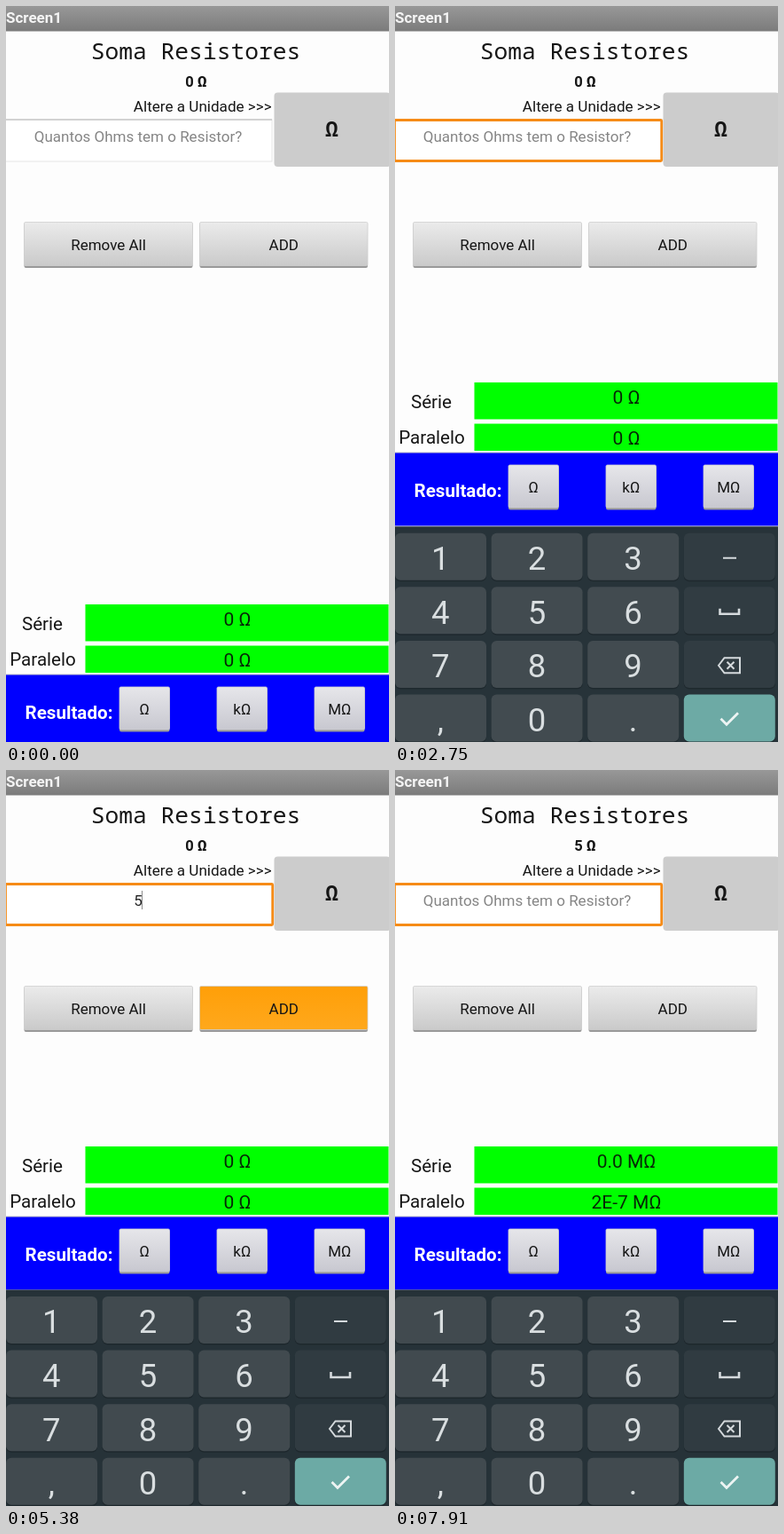
These frames come from a looping animation (432x829 px, 7990 ms). An HTML page:

```html
<!DOCTYPE html>
<html lang="pt">
<head>
<meta charset="utf-8">
<style>
html, body { margin: 0; width: 100%; height: 100%; overflow: hidden; background: #fdfdfd; }
svg { display: block; width: 100vw; height: 100vh; }
text { font-family: Roboto, "Open Sans", sans-serif; font-size: 17px; fill: #161616; text-anchor: middle; white-space: pre; }
.bold { font-weight: 700; }
.mono { font-family: "Noto Sans Mono", "DejaVu Sans Mono", monospace; }
.large { font-size: 20.6px; }
.result { font-size: 21px; fill: #062806; }
.digit { font-size: 36.5px; font-weight: 400; fill: #d9dee0; }
.icon { fill: none; stroke: #d5dadd; stroke-width: 2; }
</style>
</head>
<body>
<svg viewBox="0 0 432 829" preserveAspectRatio="none">
  <defs>
    <linearGradient id="bar" x2="0" y2="1"><stop stop-color="#989898"/><stop offset="1" stop-color="#7b7b7b"/></linearGradient>
    <linearGradient id="gray" x2="0" y2="1"><stop stop-color="#ebebeb"/><stop offset="1" stop-color="#cacaca"/></linearGradient>
    <linearGradient id="unit" x2="0" y2="1"><stop stop-color="#e6e6ea"/><stop offset="1" stop-color="#c8c8d0"/></linearGradient>
    <linearGradient id="orange" x2="0" y2="1"><stop stop-color="#ff9f08"/><stop offset="1" stop-color="#ffa81c"/></linearGradient>
  </defs>
  <rect width="432" height="829" fill="#fdfdfd"/>
  <rect width="432" height="28.5" fill="url(#bar)"/>
  <text class="bold" x="0" y="19" style="fill:#f4f4f4;text-anchor:start">Screen1</text>
  <text class="mono" x="214" y="60" style="font-size:26.3px">Soma Resistores</text>
  <text class="bold" id="list" x="214.5" y="91" style="font-size:16.5px"></text>
  <text x="299.7" y="119" style="font-size:17.1px;text-anchor:end">Altere a Unidade &gt;&gt;&gt;</text>
  <rect x="302.5" y="97.5" width="131" height="83.5" rx="4" fill="#ccc"/>
  <text class="mono bold" x="367.5" y="146.5" style="font-size:24px">Ω</text>

  <g id="idleField">
    <rect x="-1" y="128" width="301" height="47" fill="#fff" stroke="#e6e6e6"/>
    <path d="M0 128H300" stroke="#d2d2d2" stroke-width="2"/>
  </g>
  <rect id="focusField" x="-.5" y="128.5" width="301.2" height="46" rx="1" fill="#fff" stroke="#f68b17" stroke-width="2.8"/>
  <text id="entry" x="149" y="153"></text>
  <path id="caret" stroke="#8c8c8c" stroke-width="1"/>

  <g id="buttons"></g>
  <g id="panel">
    <rect y="752.5" width="432" height="1.5" fill="#b9b9c8"/>
    <rect y="753.5" width="432" height="82" fill="#00f"/>
    <path d="M89.5 674H431.5V715.5H89.5ZM89.5 720.5H431.5V751H89.5Z" fill="#0f0"/>
    <text class="large" x="41" y="703">Série</text>
    <text class="large" x="41.5" y="743">Paralelo</text>
    <text class="result" id="series" x="261" y="698"></text>
    <text class="result" id="parallel" x="261" y="744"></text>
    <text class="large bold" x="71" y="802.5" style="fill:#fff">Resultado:</text>
    <g id="units"></g>
  </g>
  <g id="keyboard">
    <rect y="585.5" width="432" height="250" fill="#263238"/>
    <g id="keys"></g>
    <g class="icon">
      <path d="M370 621H385"/>
      <path d="M366.5 678V684H388V678" stroke-width="2.6"/>
      <path d="M365 742L371.5 733.5H389V750.5H371.5ZM374.5 738L382.5 746M382.5 738L374.5 746"/>
      <path d="M367.5 802L374 808.5L387 795.5" stroke="#edf4f3" stroke-width="2.8"/>
    </g>
  </g>
</svg>
<script>
const LOOP = 7990;
const HINT = "Quantos Ohms tem o Resistor?";
const TIMES = { focus: 2350, keyboard: 2570, resize: 2600, caret: 3140, key: 4120, typed: 4200, add: 5310, added: 5450,
  kilo: 6940, kiloDone: 7040, mega: 7480, megaDone: 7580 };
const $ = id => document.getElementById(id);
const between = (t, from, to) => t >= from && t < to;

function make(parent, tag, attrs, content = "") {
  const node = document.createElementNS("http://www.w3.org/2000/svg", tag);
  for (const name in attrs) node.setAttribute(name, attrs[name]);
  node.textContent = content;
  return parent.appendChild(node);
}

function makeButton(parent, x, y, width, height, label, fill) {
  make(parent, "rect", { x, y: y + 1, width, height: height + .5, rx: 2, fill: "#999" });
  const face = make(parent, "rect", { x, y, width, height: height - 1, rx: 1.5, stroke: "#d0d0d0", "stroke-width": .8 });
  make(parent, "text", { x: x + width / 2, y: y + height / 2 + 6.5 }, label);
  return pressed => face.setAttribute("fill", `url(#${pressed ? "orange" : fill})`);
}

makeButton($("buttons"), 20.5, 243.5, 190, 50, "Remove All", "gray")(false);
const pressAdd = makeButton($("buttons"), 218.5, 243.5, 189.5, 50, "ADD", "gray");
const [pressOhm, pressKilo, pressMega] = ["Ω", "kΩ", "MΩ"].map((label, i) =>
  makeButton($("units"), 128 + 110 * i, 767, 56.5, 49, label, "unit"));
pressOhm(false);

const keyFaces = {};
["123", "456", "789", ",0."].forEach((labels, row) => {
  for (let col = 0; col < 4; col++) {
    const x = col * 108.6, y = 593 + row * 60.6;
    const fill = col < 3 ? "#414a4f" : row < 3 ? "#303b41" : "#6caaa5";
    make($("keys"), "rect", { x, y: y + 1.5, width: 103, height: 53, rx: 6, fill: "#1e282d" });
    const face = make($("keys"), "rect", { x, y, width: 103, height: 53, rx: 6, fill });
    if (col < 3) {
      keyFaces[labels[col]] = face;
      make($("keys"), "text", { class: "digit", x: x + 51.3, y: y + 41.3 }, labels[col]);
    }
  }
});

function caretVisible(t) {
  if (t < TIMES.caret) return false;
  const start = t < TIMES.typed ? TIMES.caret : t < TIMES.added ? TIMES.typed : 5370;
  return (t - start) % 1000 < 500;
}

function results(t) {
  if (t < TIMES.added) return ["0 Ω", "0 Ω"];
  if (t < TIMES.kiloDone) return ["5 Ω", "0.2 Ω"];
  if (t < TIMES.megaDone) return ["0.005 kΩ", "0.0002 kΩ"];
  return ["0.0 MΩ", "2E-7 MΩ"];
}

function render(t) {
  const focused = t >= TIMES.focus;
  const hasValue = between(t, TIMES.typed, TIMES.added);
  $("idleField").style.display = focused ? "none" : "";
  $("focusField").style.display = focused ? "" : "none";
  $("entry").textContent = hasValue ? "5" : HINT;
  $("entry").style.fill = hasValue ? "#222" : "#858585";
  $("caret").setAttribute("d", `M${hasValue ? 153.5 : 148.5} 136V157`);
  $("caret").style.display = caretVisible(t) ? "" : "none";

  $("list").textContent = t < TIMES.added ? "0 Ω" : "5 Ω";
  [$("series").textContent, $("parallel").textContent] = results(t);
  pressAdd(between(t, TIMES.add, TIMES.added));
  pressKilo(between(t, TIMES.kilo, TIMES.kiloDone));
  pressMega(between(t, TIMES.mega, TIMES.megaDone));
  keyFaces[5].setAttribute("fill", between(t, TIMES.key, TIMES.typed) ? "#5c666b" : "#414a4f");

  $("panel").setAttribute("transform", `translate(0 ${t < TIMES.resize ? 0 : -250})`);
  const progress = Math.min(1, Math.max(0, (t - TIMES.keyboard) / 200));
  const shown = 1 - (1 - progress) ** 2;
  $("keyboard").setAttribute("transform", `translate(0 ${83 * (1 - shown)})`);
  $("keyboard").setAttribute("opacity", shown);
}

const start = performance.now();
function tick() {
  render((performance.now() - start) % LOOP);
  requestAnimationFrame(tick);
}
tick();
</script>
</body>
</html>
```
